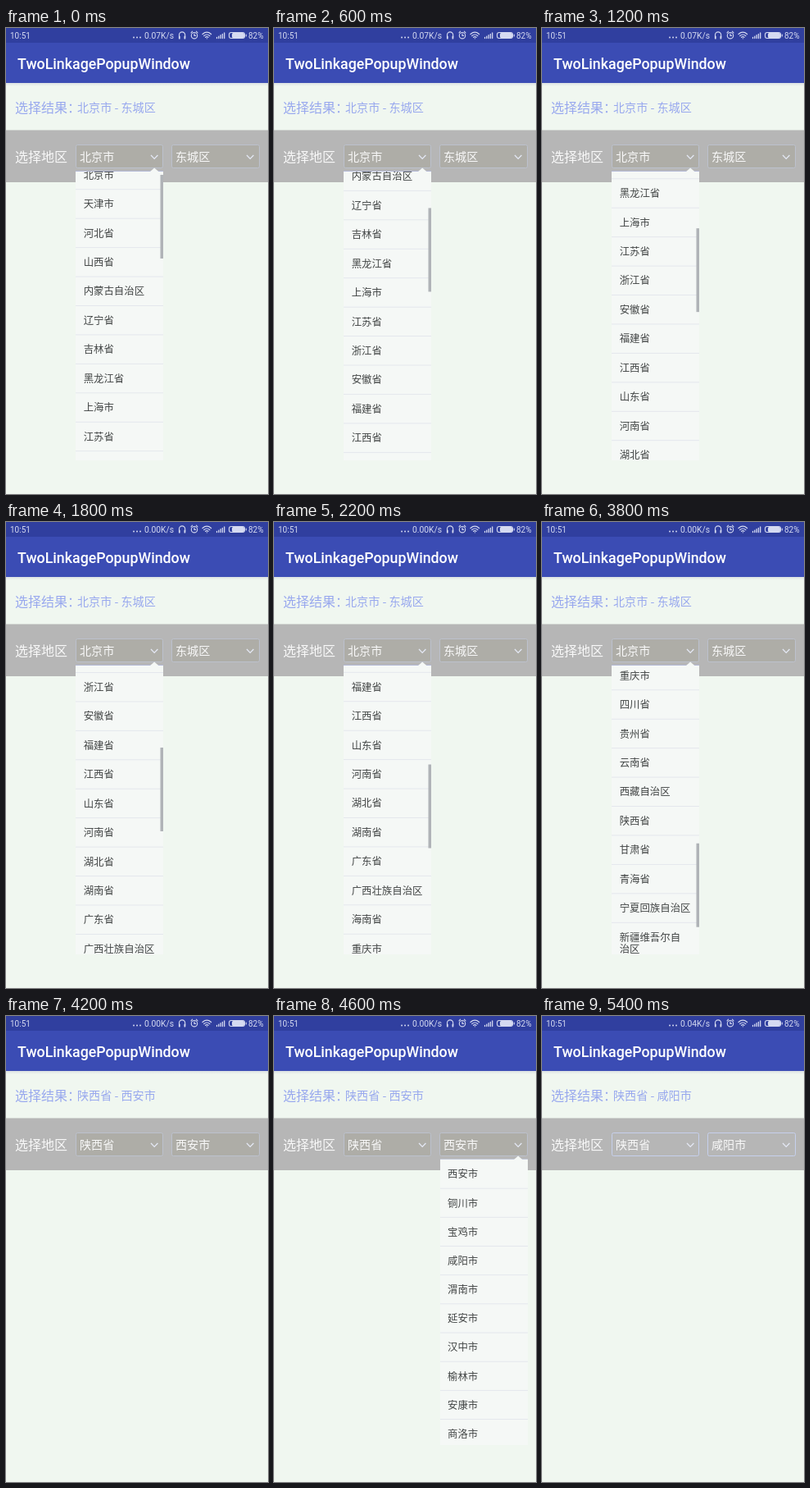
Animation, 320 px wide and 568 px high, one loop 5.6 s. Source, as an HTML page:

```html
<!DOCTYPE html>
<html lang="zh-CN">
<head>
<meta charset="utf-8">
<title>TwoLinkagePopupWindow</title>
<style>
html, body { margin: 0; width: 100%; height: 100%; overflow: hidden; background: #f0f7f0; }
svg { display: block; }
text { font-family: "Noto Sans CJK SC", "Noto Sans CJK", "Noto Sans", sans-serif; white-space: pre; }
.latin text, text.latin { font-family: Roboto, "Noto Sans", sans-serif; fill: #fff; }
.status text { font-size: 10px; fill: #d5daf1; }
.icons { fill: none; stroke: #d5daf1; stroke-width: 1.1; stroke-linecap: round; }
.title { font-size: 17.78px; font-weight: 500; }
.label { font-size: 16px; }
.value { font-size: 14.1px; }
.blue { fill: #98a8ee; }
.white { fill: #f8f8f8; }
.field rect { fill: #aeada7; stroke: #bcc1cd; }
.field path { fill: none; stroke: #e4e8f4; stroke-width: 1.3; }
.field text { fill: #f8f8f8; }
.plain .field rect { fill: #b6b6b6; stroke: #c6d0ec; }
.sheet { fill: #f5f8f6; }
.row text { font-size: 12.4px; fill: #424545; }
.row path { stroke: #e4e7ed; }
</style>
</head>
<body>
<svg id="stage" width="320" height="568" viewBox="0 0 320 568">
  <defs>
    <linearGradient id="shade" x2="0" y2="1">
      <stop stop-color="#dbe1e3"/>
      <stop offset="1" stop-color="#f0f7f0"/>
    </linearGradient>
  </defs>
  <rect width="320" height="568" fill="#f0f7f0"/>
  <rect y="67" width="320" height="4" fill="url(#shade)"/>
  <rect width="320" height="67" fill="#3b4cb4"/>
  <rect width="320" height="18" fill="#303f9f"/>

  <g class="latin status">
    <text x="5" y="12.8">10:51</text>
    <text id="speed" x="205" y="12.8" text-anchor="end" style="font-size:10.3px"></text>
    <text x="296" y="12.8">82%</text>
  </g>
  <g class="icons">
    <path d="M156 11.5h.1M160 11.5h.1M164 11.5h.1" stroke-width="1.8"/>
    <path d="M211.5 11V8.5a3.6 3.6 0 0 1 7.2 0V11"/>
    <path d="M211.8 10.5v2.2M218.4 10.5v2.2" stroke-width="1.8"/>
    <circle cx="230" cy="9.2" r="3.7"/>
    <path d="M230 7v2.4h1.6M226 5.8l1.6-1.6M234 5.8l-1.6-1.6"/>
    <path d="M240 7.5q5.3-4.6 10.6 0M241.8 9.5q3.5-3 7 0M243.6 11.3q1.7-1.4 3.4 0M245.3 12.8h.1" stroke-width="1.2"/>
    <path d="M257.5 12.5v-1M259.8 12.5v-2.4M262.1 12.5v-3.8M264.4 12.5v-5.2M266.7 12.5v-6.6" stroke-width="1.3"/>
    <rect x="272.5" y="5.5" width="19" height="7" rx="2.5"/>
    <rect x="276" y="6" width="15" height="6" rx="1.5" fill="#d5daf1" stroke="none"/>
    <path d="M293.3 8v2"/>
  </g>
  <text class="latin title" x="14" y="49.7">TwoLinkagePopupWindow</text>

  <text class="label blue" x="11" y="103">选择结果：</text>
  <text class="value blue" id="result" x="87" y="102.2"></text>

  <rect y="124.5" width="320" height="63.5" fill="#b6b6b6"/>
  <text class="label white" x="11" y="163">选择地区</text>
  <g id="fields">
    <g class="field">
      <rect x="85.5" y="142.5" width="106" height="28" rx="2"/>
      <path d="M177 155l4.2 4.4 4.2-4.4"/>
      <text class="value" id="province" x="90" y="162.4"></text>
    </g>
    <g class="field">
      <rect x="202.5" y="142.5" width="107" height="28" rx="2"/>
      <path d="M294 155l4.2 4.4 4.2-4.4"/>
      <text class="value" id="city" x="207" y="162.4"></text>
    </g>
  </g>

  <g id="provinces">
    <path d="M85 174.5h107" stroke="#b4b9d6"/>
    <path class="sheet" d="M175.5 175.5l5.7-5 5.7 5z"/>
    <svg x="85" y="175" width="107" height="352">
      <rect class="sheet" width="107" height="352"/>
      <g id="provinceRows"></g>
      <rect id="bar" x="103.5" width="3.5" height="102" fill="#b0b3b7"/>
    </svg>
  </g>

  <g id="cities">
    <path d="M203 174.5h107" stroke="#c3c8d8"/>
    <path class="sheet" d="M292.5 175.5l5.7-5 5.7 5z"/>
    <svg x="203" y="175" width="107" height="348">
      <rect class="sheet" width="107" height="348"/>
      <g id="cityRows"></g>
    </svg>
  </g>
</svg>
<script>
const LOOP = 5600, TICK = 200, LINE = 14.6;
const $ = id => document.getElementById(id);

const provinceNames = ("北京市 天津市 河北省 山西省 内蒙古自治区 辽宁省 吉林省 黑龙江省 上海市 江苏省 浙江省 " +
  "安徽省 福建省 江西省 山东省 河南省 湖北省 湖南省 广东省 广西壮族自治区 海南省 重庆市 四川省 贵州省 " +
  "云南省 西藏自治区 陕西省 甘肃省 青海省 宁夏回族自治区 新疆维吾尔自|治区").split(" ");
const cityNames = "西安市 铜川市 宝鸡市 咸阳市 渭南市 延安市 汉中市 榆林市 安康市 商洛市".split(" ");

// A "|" in a name breaks it into two lines.
function fillRows(group, names, pitch, x) {
  group.innerHTML = names.map((name, i) => {
    const top = i * pitch;
    const texts = name.split("|").map((line, k) =>
      `<text x="${x}" y="${top + 22.4 + k * LINE}">${line}</text>`).join("");
    const rule = i < names.length - 1 ? `<path d="M0 ${top + pitch}h107"/>` : "";
    return `<g class="row">${texts}${rule}</g>`;
  }).join("");
}
fillRows($("provinceRows"), provinceNames, 35.44, 9.7);
fillRows($("cityRows"), cityNames, 35.17, 9);

// [time, scroll offset, easing power towards this point]
const stops = [[0, 13.7], [1200, 239.3, 1.4], [2200, 417, 1], [3000, 647.6, 1], [3800, 749.9, 1.6]];

function scrollAt(t) {
  const i = stops.findIndex(s => s[0] > t);
  if (i < 0) return stops[stops.length - 1][1];
  const [t0, y0] = stops[i - 1], [t1, y1, power] = stops[i];
  return y0 + (y1 - y0) * (1 - Math.pow(1 - (t - t0) / (t1 - t0), power));
}

const show = (id, on) => $(id).setAttribute("visibility", on ? "visible" : "hidden");

function draw(t) {
  const scroll = scrollAt(t);
  const province = t < 4200 ? "北京市" : "陕西省";
  const city = t < 4200 ? "东城区" : t < 5200 ? "西安市" : "咸阳市";
  $("speed").textContent = (t < 1600 ? "0.07" : t < 5000 ? "0.00" : "0.04") + "K/s";
  $("result").textContent = `${province} - ${city}`;
  $("province").textContent = province;
  $("city").textContent = city;
  $("fields").setAttribute("class", t < 5200 ? "" : "plain");
  $("provinceRows").setAttribute("transform", `translate(0 ${-scroll})`);
  $("bar").setAttribute("y", scroll * 0.289);
  show("provinces", t < 4200);
  show("cities", t >= 4600 && t < 5200);
}

const start = performance.now();
let last = -1;
function frame() {
  const now = Math.max(0, performance.now() - start) % LOOP;
  const t = Math.floor(now / TICK) * TICK;
  if (t !== last) draw(last = t);
  requestAnimationFrame(frame);
}
frame();
</script>
</body>
</html>
```
